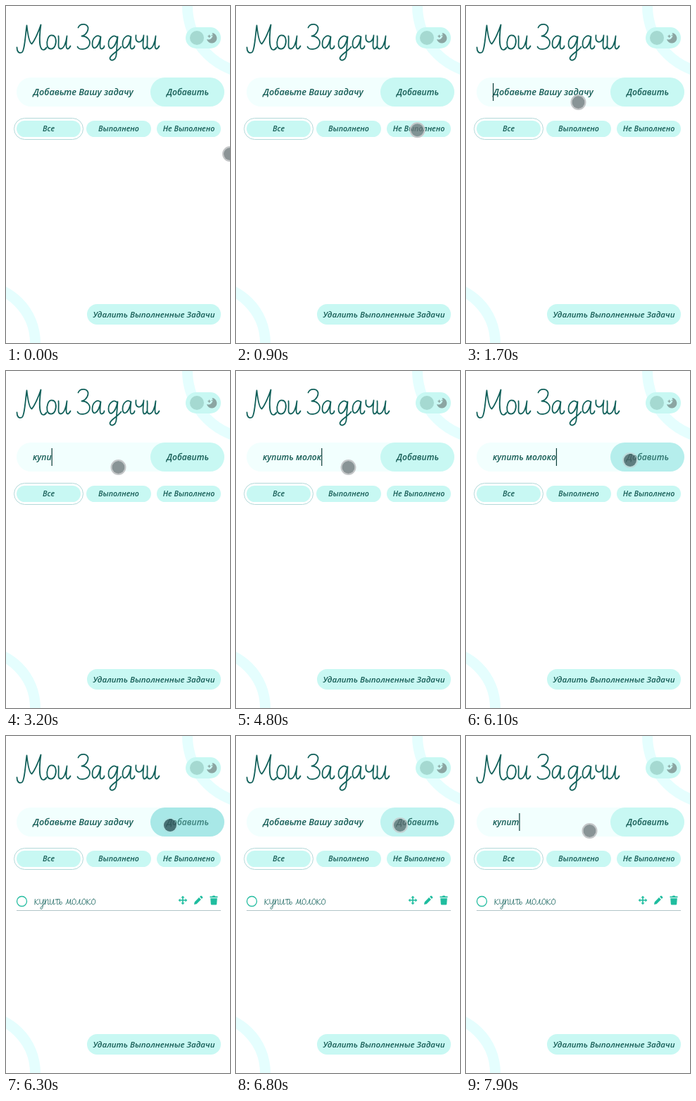
An HTML page that plays this animation: 318x476 px, repeating every 8000 ms.

```html
<!DOCTYPE html>
<html lang="ru">
<head>
<meta charset="utf-8">
<title>Мои Задачи</title>
<style>
  html, body { margin: 0; width: 100%; height: 100%; overflow: hidden; background: #fff; }
  svg { display: block; width: 100vw; height: 100vh; }
  text { font: italic 600 12.1px 'Open Sans', 'Noto Sans', sans-serif; fill: #155c55; white-space: pre; }
  .mid { text-anchor: middle; }
  .hint { font-size: 12.7px; }
  .small { font-size: 10.7px; }
  .wide { font-size: 11.5px; }
  .pill { fill: #c8f8f3; }
  .ring { fill: none; stroke: #e5fefe; stroke-width: 15; }
  .script { fill: none; stroke: #11605a; stroke-linecap: round; stroke-linejoin: round; }
  .icon { fill: #1fbd9f; }
</style>
</head>
<body>
<svg viewBox="0 0 318 476" xmlns="http://www.w3.org/2000/svg">
  <circle class="ring" cx="353" cy="0" r="95.5"/>
  <circle class="ring" cx="-40" cy="476" r="81.5"/>

  <g id="title" class="script" role="img" aria-label="Мои Задачи" transform="translate(15.5 60.5)" stroke-width="1.8"></g>

  <rect class="pill" x="255" y="30" width="50" height="30" rx="15"/>
  <circle cx="271" cy="45" r="10" fill="#a5d9d1"/>
  <g fill="#8ba5a2">
    <path d="M292.5 38A7.3 7.3 0 1 1 285 47A6.2 6.2 0 0 0 292.5 38Z"/>
    <path d="M288.5 40l.8 2 2 .8-2 .8-.8 2-.8-2-2-.8 2-.8Z"/>
    <circle cx="292.5" cy="41.5" r=".8"/>
  </g>

  <rect x="15" y="101" width="240" height="41" rx="20.5" fill="#f2fffe"/>
  <rect id="add" x="205" y="101" width="105" height="41" rx="20.5"/>
  <text id="addText" class="mid" x="258" y="126">Добавить</text>
  <text id="hint" class="hint" x="38.5" y="126">Добавьте Вашу задачу</text>
  <text id="field" x="38" y="126"></text>
  <rect id="caret" y="109" width="1.2" height="25" fill="#0b3b37"/>

  <rect x="11.5" y="158.5" width="98" height="30" rx="15" fill="#fff" stroke="#b3d9d9"/>
  <rect class="pill" x="15" y="162" width="91" height="23" rx="11.5"/>
  <rect class="pill" x="114" y="162" width="92" height="23" rx="11.5"/>
  <rect class="pill" x="214" y="162" width="91" height="23" rx="11.5"/>
  <text class="mid small" x="60.5" y="177">Все</text>
  <text class="mid small" x="160" y="177">Выполнено</text>
  <text class="mid small" x="259.5" y="177">Не Выполнено</text>

  <g id="item">
    <circle cx="22.5" cy="233.5" r="7" fill="none" stroke="#27bda1" stroke-width="1.3"/>
    <g id="task" class="script" role="img" aria-label="купить молоко" transform="translate(40.5 238) scale(.41)" stroke-width="2"></g>
    <g class="icon">
      <g id="arrows" transform="translate(251 232)"></g>
      <path d="M267 238l.7-3.6 6.3-6.3 2.9 2.9-6.3 6.3Z M275 227.1l1.2-1.2q.8-.6 1.6 0l1.3 1.3q.6.8 0 1.6l-1.2 1.2Z"/>
      <path d="M289.5 226.5h3.3l.8-1h2.8l.8 1h3.3v1.7h-11Z M290.2 229.2h9.6l-.6 8.4q-.1 1-1.2 1h-6q-1.1 0-1.2-1Z"/>
    </g>
    <path d="M15 246.5H305" stroke="#b2c5c8"/>
  </g>

  <rect class="pill" x="115" y="421" width="190" height="29" rx="14.5"/>
  <text class="mid wide" x="210" y="440">Удалить Выполненные Задачи</text>

  <g id="pointer">
    <circle id="halo" r="10" fill="none" stroke="#c4c6c8" stroke-width="2"/>
    <circle id="dot" r="9"/>
  </g>
</svg>
<script>
const LOOP = 8000;
const TASK = 'купить молоко';
const $ = id => document.getElementById(id);

// Pen strokes of the handwriting: [advance, path], baseline at 0.
const GLYPHS = {
  'М': [42, 'M0-2C0 4 3 7 7 5C11 3 12-20 14-33C15-24 17-9 21-7C25-11 31-25 34-34C32-20 31-2 36 1C39 2 41 0 42-2'],
  'З': [21, 'M2-30C5-37 17-36 16-28C15-21 9-18 7-18C15-18 20-12 18-6C15 2 3 2 1-3'],
  'о': [16, 'M8-19C2-20 0-10 1-5C2 1 9 2 12-4C15-11 13-19 8-19'],
  'и': [18, 'M1-18C2-10-1 0 4 0C9 0 12-10 13-18C12-8 11 0 14 0C16 0 17-2 18-4'],
  'а': [19, 'M13-16C9-22 1-16 1-7C1 2 9 2 13-17C12-8 11 0 14 0C17 0 18-3 18-4'],
  'д': [24, 'M18-15C14-22 5-16 5-7C5 3 14 2 18-17L16 9C15 17 7 18 7 13C8 8 18 4 23-3'],
  'ч': [16, 'M1-19C0-11 3-9 7-10C10-11 12-16 12-19C11-8 10 0 13 0C15 0 16-2 16-3'],
  'к': [17, 'M2-18L1 0M13-18C9-17 6-10 2-9C6-10 7 0 11 0C13 0 15-2 16-4'],
  'у': [18, 'M1-18C0-8 2-2 6-2C10-2 13-12 14-18C13-5 12 8 10 13C7 18 2 15 4 11C7 6 13 3 17-3'],
  'п': [18, 'M2-18L1 0C3-10 8-19 11-18C14-17 10 0 13 0C16 0 17-3 17-3'],
  'т': [14, 'M1-17L14-18M8-18C7-8 6 0 9 0C11 0 12-2 13-3'],
  'ь': [14, 'M2-18C1-8 1 0 4 0C11 0 12-9 7-9C4-9 2-6 2-5'],
  'м': [22, 'M0-1C4 1 6-12 7-18C7-8 9-3 10-3C12-3 15-12 17-18C16-8 15 0 18 0C20 0 21-2 22-4'],
  'л': [18, 'M0-1C5 2 8-10 11-18C10-8 10 0 13 0C16 0 17-2 18-4'],
  ' ': [9, '']
};

function write(group, words) {
  let x = 0;
  group.innerHTML = [...words].map(ch => {
    const [advance, d] = GLYPHS[ch];
    const path = `<path transform="translate(${x})" d="${d}"/>`;
    x += advance;
    return path;
  }).join('');
}
write($('title'), 'Мои Задачи');
write($('task'), TASK);
$('arrows').innerHTML = [0, 90, 180, 270].map(a =>
  `<path transform="rotate(${a})" d="M-.8 0V-3.6H-2.6L0-6.3L2.6-3.6H.8V0Z"/>`).join('');

// Key presses add the next letter; a focus shows the caret, a blur hides it.
const ADDED = 6200;
const sessions = [
  { focus: 1600, blur: ADDED, keys: [2200, 2800, 3000, 3200, 3600, 3800, 4200, 4300, 4400, 4500, 4600, 4800, 5000] },
  { focus: 7300, blur: LOOP, keys: [7400, 7500, 7700, 7700, 7900] }
];

// Pointer moves: start, end, then start, control and end points.
const moves = [
  [550, 1400, [318, 209], [235, 158], [159.5, 136]],
  [5600, 5900, [159.5, 136], [196, 139], [233, 126]],
  [7050, 7350, [233, 126], [204, 130], [175.5, 134]]
];

const ramp = (t, a, b) => Math.min(1, Math.max(0, (t - a) / (b - a)));
const smooth = u => u * u * (3 - 2 * u);
const mix = (a, b, u) => a.map((v, i) => v + (b[i] - v) * u);
const show = (id, on) => { $(id).style.display = on ? '' : 'none'; };

function pointerAt(t) {
  const [a, b, p, q, r] = moves.filter(m => t >= m[0]).pop() || moves[0];
  const u = smooth(ramp(t, a, b));
  return mix(mix(p, q, u), mix(q, r, u), u);
}

function drawField(t) {
  const s = sessions.find(s => t >= s.focus && t < s.blur);
  const typed = s ? s.keys.filter(k => t >= k) : [];
  const words = TASK.slice(0, typed.length);
  $('field').textContent = words;
  show('hint', !words);
  const since = s ? t - (typed[typed.length - 1] || s.focus) : 500;
  show('caret', since % 1000 < 500);
  $('caret').setAttribute('x', 38 + (words ? $('field').getComputedTextLength() : 0));
}

function draw(t) {
  drawField(t);
  show('item', t >= ADDED);

  const press = ramp(t, 5950, 6200) * (1 - ramp(t, 6550, 6900));
  $('add').setAttribute('fill', `rgb(${mix([200, 248, 243], [168, 232, 231], press)})`);
  $('addText').setAttribute('opacity', 1 - .25 * press);

  $('pointer').setAttribute('transform', `translate(${pointerAt(t)})`);
  $('dot').setAttribute('fill', `rgba(${mix([108, 118, 120, .78], [45, 80, 84, .78], press)})`);
  $('halo').setAttribute('opacity', 1 - .85 * press);
}

const start = performance.now();
function frame(now) {
  draw(Math.max(0, now - start) % LOOP);
  requestAnimationFrame(frame);
}
draw(0);
requestAnimationFrame(frame);
</script>
</body>
</html>
```
